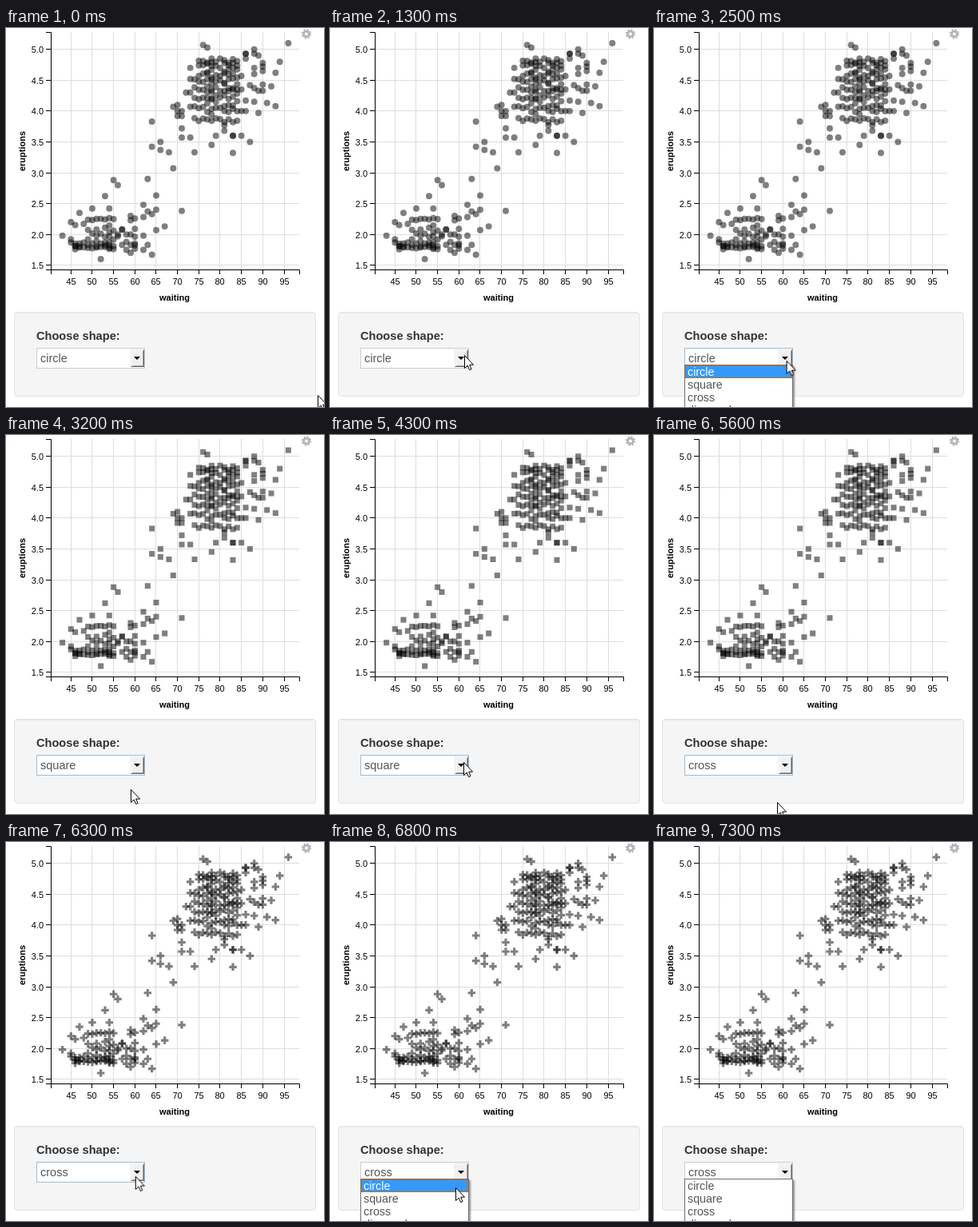
An HTML page that plays this animation: 398 px wide and 474 px high, repeating every 8 s.

```html
<!DOCTYPE html>
<html lang="en">
<head>
<meta charset="utf-8">
<title>Scatter plot with shape picker</title>
<style>
html, body { margin: 0; width: 100%; height: 100%; overflow: hidden; background: #fff; }
body { position: relative; font: 14.5px "Liberation Sans", Arial, sans-serif; color: #555; }
body > *, .select > * { position: absolute; box-sizing: border-box; }
svg { left: 0; top: 0; overflow: visible; }

#plot { font-size: 11px; fill: #000; }
.title { font-weight: bold; text-anchor: middle; }
.grid { stroke: #ddd; }
.axis { stroke: #000; fill: none; }
.gear { stroke: #b4b4b4; fill: none; }
.marks { fill: #000; fill-opacity: .5; }

.panel { left: 10px; top: 355px; width: 378px; height: 106px; background: #f5f5f5;
  border: 1px solid #e3e3e3; border-radius: 4px; box-shadow: inset 0 1px 1px rgba(0,0,0,.05); }
.label { left: 38px; top: 375px; line-height: 20px; font-weight: bold; font-size: 14.6px; color: #333; }
.select { left: 38px; top: 400px; width: 136px; height: 26px; background: #fff;
  border: 1px solid #ccc; line-height: 24px; }
.select span { left: 4px; top: 0; }
.button { left: 117px; top: 1px; width: 17px; height: 22px; background: #f0f0f0;
  border: 1px solid; border-color: #e3e3e3 #696969 #696969 #e3e3e3;
  box-shadow: inset 1px 1px #fff, inset -1px -1px #a0a0a0; }
.button::after { content: ""; position: absolute; left: 3px; top: 8px;
  border: solid transparent; border-width: 4px 4px 0; border-top-color: #000; }
.list { left: 38px; top: 421px; width: 136px; height: 70px; background: #fff;
  border: 1px solid #6e6e6e; box-shadow: 2px 2px 2px rgba(0,0,0,.4); }
.list div { box-sizing: border-box; height: 16px; padding-left: 2px; line-height: 14px;
  font-size: 14.3px; border: 1px solid #fff; }

/* A 10 ms lead keeps every step clear of its boundary. */
.anim { animation: 8s step-end -10ms infinite; }
.circle { animation-name: circle; }
.square { animation-name: square; }
.cross { animation-name: cross; }
.marks.circle { animation-name: circleMarks; }
.marks.square { animation-name: squareMarks; }
.marks.cross { animation-name: crossMarks; }
.select { animation-name: focus; }
.list { animation-name: open; }
.list .r1 { animation-name: row1; }
.list .r2 { animation-name: row2; }
.list .r3 { animation-name: row3; }
.list .r4 { animation-name: row4; }
#cursor { animation-name: move; }

@keyframes circle { 0% { opacity: 1 } 40%, 100% { opacity: 0 } }
@keyframes square { 0%, 70%, 100% { opacity: 0 } 40% { opacity: 1 } }
@keyframes cross { 0% { opacity: 0 } 70%, 100% { opacity: 1 } }
@keyframes circleMarks { 0% { visibility: visible } 40%, 100% { visibility: hidden } }
@keyframes squareMarks { 0%, 71.25%, 100% { visibility: hidden } 40% { visibility: visible } }
@keyframes crossMarks { 0% { visibility: hidden } 71.25%, 100% { visibility: visible } }
@keyframes focus { 0%, 81.25%, 100% { border-color: #ccc } 26.25% { border-color: #9dbdd6 } }
@keyframes open {
  0%, 40%, 70% { opacity: 0 }
  26.25%, 57.5%, 81.25%, 100% { opacity: 1 }
}
@keyframes row1 {
  0%, 61.25%, 83.75% { background: #39f; color: #fff; border-color: #c07028 }
  36.25%, 62.5%, 86.25%, 100% { background: #fff; color: #555; border-color: #fff }
}
@keyframes row2 {
  36.25%, 62.5%, 86.25% { background: #39f; color: #fff; border-color: #c07028 }
  0%, 61.25%, 65%, 87.5%, 100% { background: #fff; color: #555; border-color: #fff }
}
@keyframes row3 {
  65%, 87.5% { background: #39f; color: #fff; border-color: #c07028 }
  0%, 83.75%, 88.75%, 100% { background: #fff; color: #555; border-color: #fff }
}
@keyframes row4 {
  88.75% { background: #39f; color: #fff; border-color: #c07028 }
  0%, 91.25%, 100% { background: #fff; color: #555; border-color: #fff }
}
@keyframes move {
  0% { transform: translate(390px, 459px); animation-timing-function: steps(4) }
  5% { transform: translate(318px, 390px); animation-timing-function: steps(3) }
  8.75% { transform: translate(212px, 334px); animation-timing-function: steps(2) }
  11.25% { transform: translate(153px, 362px); animation-timing-function: steps(4) }
  16.25% { transform: translate(168px, 409px) }
  30% { transform: translate(168px, 409px); animation-timing-function: steps(5) }
  36.25% { transform: translate(156px, 443px) }
  45% { transform: translate(156px, 443px); animation-timing-function: steps(4) }
  50% { transform: translate(170px, 409px) }
  53.75% { transform: translate(167px, 409px) }
  57.5% { transform: translate(167px, 409px); animation-timing-function: steps(2) }
  60% { transform: translate(163px, 418px); animation-timing-function: steps(4) }
  65% { transform: translate(154px, 459px) }
  71.25% { transform: translate(154px, 459px); animation-timing-function: steps(7) }
  80% { transform: translate(163px, 411px) }
  81.25% { transform: translate(163px, 411px); animation-timing-function: steps(3) }
  85% { transform: translate(157px, 432px); animation-timing-function: steps(3) }
  88.75%, 100% { transform: translate(158px, 476px) }
}
</style>
</head>
<body>
<svg id="plot" width="398" height="350">
  <g id="scales"></g>
  <g id="marks"></g>
  <path class="axis" d="M50 5.5H56.5V302.5H50M56.5 308V302.5H367.5V308"/>
  <text class="title" x="211" y="341">waiting</text>
  <text class="title" transform="translate(24 154) rotate(-90)">eruptions</text>
  <g class="gear">
    <circle cx="376" cy="7.5" r="3.4" stroke-width="2.8"/>
    <circle cx="376" cy="7.5" r="5.2" stroke-width="2" stroke-dasharray="2.04"/>
  </g>
</svg>

<div class="panel"></div>
<div class="label">Choose shape:</div>
<div class="select anim">
  <span class="circle anim">circle</span>
  <span class="square anim">square</span>
  <span class="cross anim">cross</span>
  <div class="button"></div>
</div>
<div class="list anim">
  <div class="r1 anim">circle</div>
  <div class="r2 anim">square</div>
  <div class="r3 anim">cross</div>
  <div class="r4 anim">diamond</div>
</div>
<svg id="cursor" class="anim" width="14" height="20">
  <path d="M.5 .5V16.5L4.2 13.1L6.6 18.6L9 17.6L6.6 12.2H11.5Z" fill="#fff" stroke="#000"/>
</svg>

<script>
const px = w => 56.5 + (w - 40.35) * 5.334;
const py = e => 302.5 - (e - 1.425) * 77.14;
const snap = v => Math.floor(v) + .5;

// Axes and grid
let scales = '';
for (let w = 45; w <= 95; w += 5) {
  const x = snap(px(w));
  scales += `<path class="grid" d="M${x} 5V302"/><path class="axis" d="M${x} 302V308"/>
    <text x="${x}" y="321" text-anchor="middle">${w}</text>`;
}
for (let e = 1.5; e <= 5; e += .5) {
  const y = snap(py(e));
  scales += `<path class="grid" d="M57 ${y}H367"/><path class="axis" d="M50 ${y}H56"/>
    <text x="47" y="${y + 4}" text-anchor="end">${e.toFixed(1)}</text>`;
}
document.getElementById('scales').innerHTML = scales;

// Sparse points by waiting time; the two dense clusters are generated below
const sparse = {
  43: [1.98], 45: [1.87, 1.92, 2.2], 46: [2.15], 47: [2.35], 48: [2.17], 50: [2.42],
  52: [1.6], 53: [2.62], 54: [2.42], 55: [2.88], 56: [2.8, 1.97, 2],
  57: [2.08, 2.08, 1.83], 58: [2, 1.88, 1.75], 59: [2.3, 2.23, 2, 1.83, 1.7],
  62: [2.48, 2.28, 1.98, 1.75], 63: [2.9, 2.37, 1.83], 64: [3.83, 3.42, 2.33, 1.67],
  65: [2.63, 2.4, 2.07], 66: [3.5, 3.37], 67: [2.13], 68: [3.33], 69: [4.07, 3.07],
  70: [4.1, 4, 3.92], 71: [4, 3.92, 3.72, 3.57, 2.38], 72: [4.3],
  73: [4.7, 4.52, 4.3, 4.07, 3.57], 74: [3.33], 76: [5.07], 77: [5.03], 78: [3.45],
  79: [3.6], 81: [3.68, 3.77], 83: [3.32, 3.6, 3.6],
  85: [4.57, 4.35, 4, 3.6], 86: [4.93, 4.93, 4.85, 4.17, 4], 87: [4.42, 3.5],
  88: [5, 4.93, 4.7, 4.6, 4.37, 4.15], 89: [4.9, 4.33, 3.97],
  90: [4.78, 4.72, 4.65, 4.43, 4.33], 91: [4.13], 92: [4.4], 93: [4.62, 4.08],
  94: [4.8], 96: [5.1]
};
const points = Object.entries(sparse).flatMap(([w, list]) => list.map(e => [+w, e]));

let seed = 7;
const jitter = size => {
  seed = (seed * 16807) % 2147483647;
  return (seed / 2147483647 - .5) * size;
};
function cluster(start, counts, level, noise) {
  counts.forEach((n, i) => {
    for (let k = 0; k < n; k++) {
      points.push([start + i, level(k / (n - 1), start + i) + jitter(noise)]);
    }
  });
}
cluster(46, [4, 3, 2, 5, 4, 6, 4, 6, 8, 5, 0, 0, 0, 0, 6],
  (t, w) => 1.78 + (w < 49 ? .08 : .47) * t ** 1.8, .04);
cluster(74, [5, 8, 8, 11, 14, 9, 8, 11, 11, 11, 10],
  (t, w) => 3.85 + (w === 74 ? .68 : .97) * t ** .8, .08);

// One layer per symbol, each of area 50
const r = Math.sqrt(50 / Math.PI), h = Math.sqrt(50) / 2, c = Math.sqrt(50 / 5) / 2;
const symbols = {
  circle: `m${-r} 0a${r} ${r} 0 1 1 ${2 * r} 0a${r} ${r} 0 1 1 ${-2 * r} 0z`,
  square: `m${-h} ${-h}h${2 * h}v${2 * h}h${-2 * h}z`,
  cross: `m${-3 * c} ${-c}` + [[1, 0], [0, -1], [1, 0], [0, 1], [1, 0], [0, 1],
    [-1, 0], [0, 1], [-1, 0], [0, -1], [-1, 0]]
    .map(([x, y]) => `l${x * 2 * c} ${y * 2 * c}`).join('') + 'z'
};
document.getElementById('marks').innerHTML = Object.entries(symbols).map(([name, d]) =>
  `<g class="marks ${name} anim">` +
  points.map(([w, e]) => `<path d="M${px(w)} ${py(e)}${d}"/>`).join('') + '</g>').join('');
</script>
</body>
</html>
```
